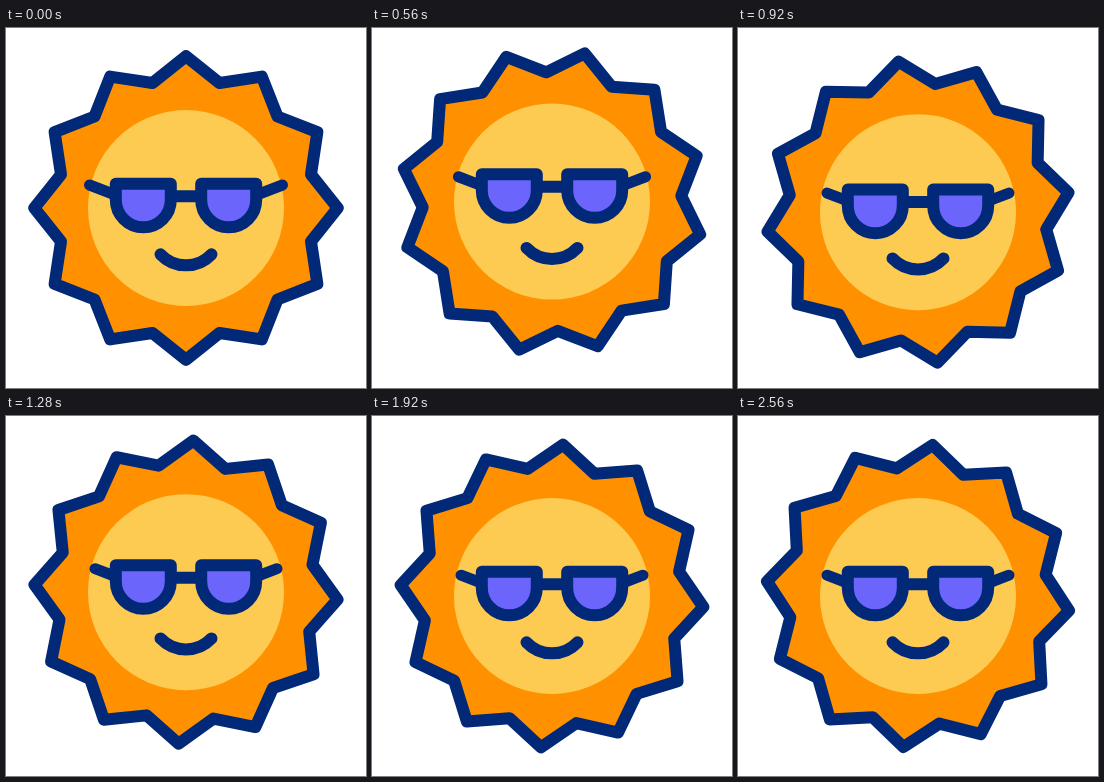
An HTML page for the animation above (2600 ms loop, 360 by 360 pixels).

```html
<!DOCTYPE html>
<html lang="en">
<head>
<meta charset="utf-8">
<title>Cool sun</title>
<style>
  html, body { margin: 0; width: 100%; height: 100%; overflow: hidden; background: #fff; }
  svg { display: block; width: 100%; height: 100%; }
  .line { stroke: #022878; stroke-width: 12; stroke-linecap: round; stroke-linejoin: round; fill: none; }
</style>
</head>
<body>
<svg viewBox="0 0 360 360">
  <g id="body">
    <polygon id="rays" class="line" style="fill:#ff9100"/>
    <circle cx="180" cy="180" r="98" fill="#fecb52"/>
    <path class="line" d="M154.5 226.3A35 35 0 0 0 205.5 226.3"/>
  </g>
  <g id="glasses" class="line">
    <path id="arms" stroke-width="11"/>
    <path d="M164.5 168.2H195.5"/>
    <path fill="#6b65fb" d="M109.8 155.7H164.8V171.8a27.5 27.5 0 0 1-55 0ZM195.2 155.7H250.2V171.8a27.5 27.5 0 0 1-55 0Z"/>
  </g>
</svg>
<script>
const LOOP = 2600, STEP = 40;
const $ = id => document.getElementById(id);

// Keys are [time, value] pairs, eased in and out between neighbours.
const bodyKeys = [[0, 0], [300, 12], [633, -9], [1000, 6], [1367, -5.5], [1733, 0]];
const glassesKeys = [[0, 0], [300, 16], [633, -13], [1000, 8.5], [1367, -9], [1800, 0]];
const armKeys = [[300, 0], [800, 1]];

function track(keys, t) {
  if (t <= keys[0][0]) return keys[0][1];
  for (let i = 1; i < keys.length; i++) {
    const [t0, a] = keys[i - 1], [t1, b] = keys[i];
    if (t < t1) {
      const p = (t - t0) / (t1 - t0);
      return a + (b - a) * p * p * (3 - 2 * p);
    }
  }
  return keys[keys.length - 1][1];
}

$('rays').setAttribute('points', Array.from({ length: 24 }, (_, i) => {
  const angle = i * Math.PI / 12, r = i % 2 ? 129.4 : 151.7;
  return [180 + r * Math.sin(angle), 180 - r * Math.cos(angle)];
}).join(' '));

function draw(now) {
  const t = Math.floor(now % LOOP / STEP) * STEP;
  const fold = track(armKeys, t);
  const reach = 96.5 - 5.5 * fold, tipY = 157 + 2.2 * fold;
  $('body').setAttribute('transform', `translate(0 ${track(bodyKeys, t)})`);
  $('rays').setAttribute('transform', `rotate(${-360 * t / LOOP} 180 180)`);
  $('glasses').setAttribute('transform', `translate(0 ${track(glassesKeys, t)})`);
  $('arms').setAttribute('d', `M${180 - reach} ${tipY}L107 166M${180 + reach} ${tipY}L253 166`);
}

const start = performance.now();
function tick() {
  draw(performance.now() - start);
  requestAnimationFrame(tick);
}
tick();
</script>
</body>
</html>
```
